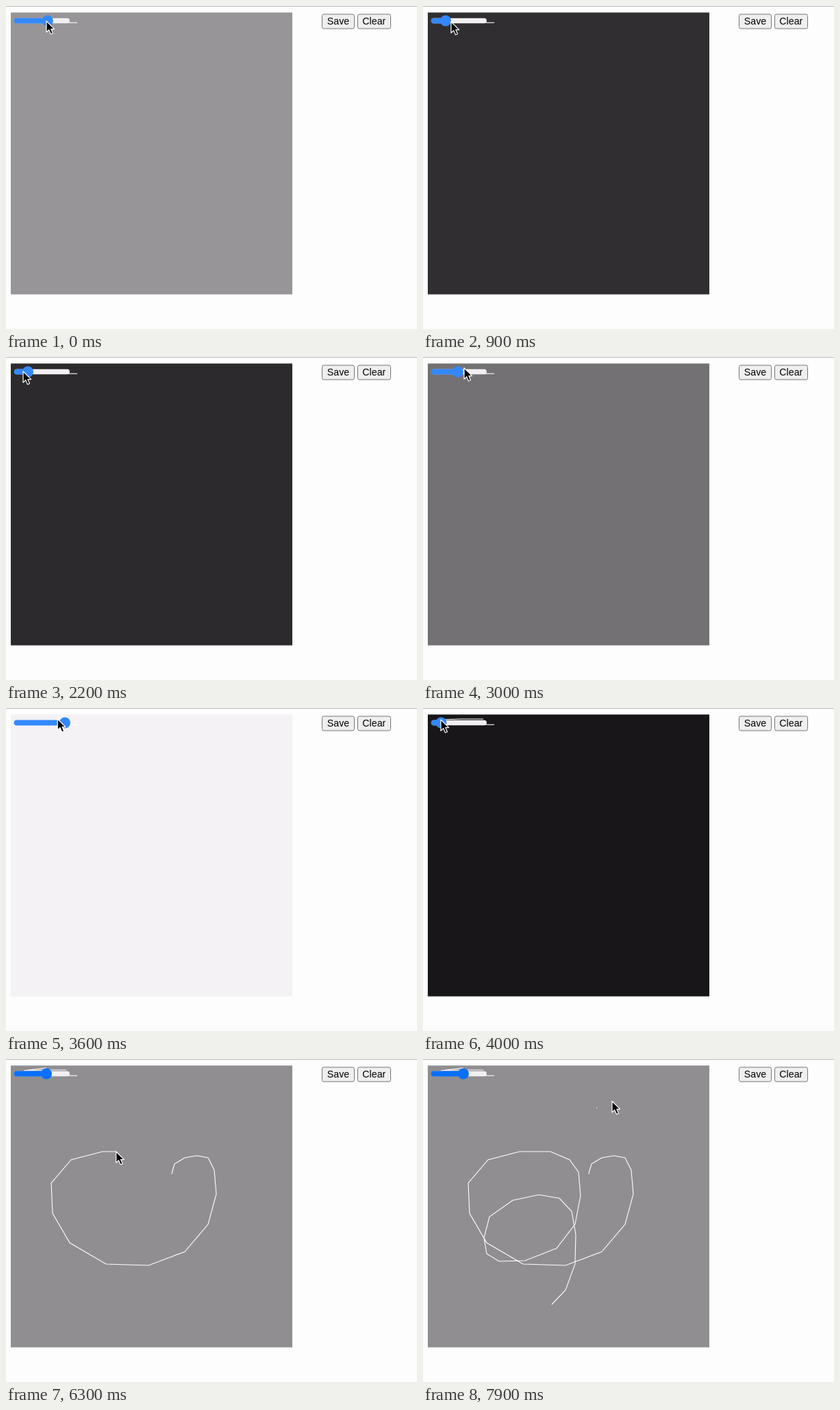
An HTML page for the animation above (8 s loop, 600x471 px).

```html
<!DOCTYPE html>
<html lang="en">
<head>
<meta charset="utf-8">
<title>Drawing pad</title>
<style>
  html, body { margin: 0; width: 100%; height: 100%; overflow: hidden; background: #fefdfe; }
  svg { display: block; width: 600px; height: 471px; }
  text { font: 14.2px "Liberation Sans", Arial, sans-serif; text-anchor: middle; fill: #000; }
  .button { fill: #efefef; stroke: #767676; }
  .ink { fill: none; stroke: #fff; stroke-width: 1.1; }
</style>
</head>
<body>
<svg viewBox="0 0 600 471">
  <rect width="600" height="1" fill="#b9b8b9"/>
  <rect id="pad" x="7" y="9.5" width="411" height="411"/>
  <path class="ink" d="M80 24.3H104"/>
  <polyline class="ink" id="scribble"/>
  <polyline class="ink" id="drawing"/>
  <rect id="dot" x="253" y="70.5" width="1.2" height="1.2" fill="#fff"/>

  <rect x="12" y="17.7" width="81" height="7.6" rx="3.8" fill="#f2eff2"/>
  <g id="slider">
    <rect id="fill" x="11.7" y="17.5" height="8" rx="4"/>
    <circle id="thumb" cy="21.5" r="8"/>
  </g>

  <rect class="button" x="461.5" y="12" width="47" height="21" rx="2.5"/>
  <text x="485" y="27">Save</text>
  <rect class="button" x="513.5" y="12" width="48" height="21" rx="2.5"/>
  <text x="537.3" y="27">Clear</text>

  <path id="cursor" d="M0 0V16.2L3.7 12.7L6.5 19L9.5 17.7L6.8 11.6H11.7Z"
    fill="#000" stroke="#fff" stroke-width="1.2" stroke-linejoin="round"/>
</svg>
<script>
const LOOP = 8000, TICK = 100;
const DRAW_START = 5700, POINT_TIME = 36.5;
const get = id => document.getElementById(id);
const [pad, scribble, drawing, dot, slider, fill, thumb, cursor] =
  ["pad", "scribble", "drawing", "dot", "slider", "fill", "thumb", "cursor"].map(get);

const stroke = [
  [242, 168], [243, 163], [246, 153], [261, 144], [279, 141], [295, 144],
  [304, 162], [307, 197], [295, 241], [261, 281], [208, 301], [146, 299],
  [93, 268], [68, 225], [66, 181], [95, 147], [141, 135], [186, 135],
  [214, 147], [227, 165], [230, 199], [222, 241], [195, 276], [149, 294],
  [111, 295], [93, 284], [89, 261], [97, 230], [131, 206], [169, 198],
  [199, 203], [217, 222], [223, 256], [222, 299], [208, 337], [188, 358]
];

// [time, x, y]
const pointer = [
  [0, 59, 22], [600, 20, 23], [900, 41, 23], [1500, 84, 22], [2200, 25, 21],
  [2400, 18, 20], [3000, 60, 16], [3500, 88, 16], [3750, 56, 16], [4000, 26, 17],
  [4600, 59, 13], [5400, 59, 13],
  ...stroke.map(([x, y], i) => [DRAW_START + i * POINT_TIME, x, y]),
  [7200, 223, 99], [7400, 254, 70], [7600, 254, 70], [7900, 276, 61.5], [LOOP, 276, 61.5]
];

// [time, thumb x]
const slide = [
  [0, 60.8], [650, 22], [900, 33], [1600, 82], [2200, 32], [2500, 22],
  [3000, 51], [3600, 86], [4000, 26.5], [4700, 59], [LOOP, 59]
];

function sample(keys, t) {
  const i = Math.max(1, keys.findIndex(k => k[0] >= t));
  const a = keys[i - 1], b = keys[i];
  const p = (t - a[0]) / (b[0] - a[0]);
  return a.slice(1).map((v, n) => v + (b[n + 1] - v) * p);
}

function trail(from, to, t) {
  if (t < from) return "";
  const done = pointer.filter(k => k[0] >= from && k[0] <= Math.min(t, to)).map(k => k.slice(1));
  if (t < to) done.push(sample(pointer, t));
  return done.join(" ");
}

function render(now) {
  const t = Math.floor(now % LOOP / TICK) * TICK;
  const [x, y] = sample(pointer, t);
  const [sx] = sample(slide, t);
  const grey = Math.round((sx - 20) / 0.27);

  pad.setAttribute("fill", `rgb(${grey},${Math.max(0, grey - 2)},${grey})`);
  fill.setAttribute("width", sx - 11.7);
  thumb.setAttribute("cx", sx);
  slider.setAttribute("fill", t < 5500 ? "#3488fb" : "#0a70fd");
  cursor.setAttribute("transform", `translate(${x} ${y})`);
  scribble.setAttribute("points", trail(3500, 4600, t));
  drawing.setAttribute("points", trail(DRAW_START, DRAW_START + (stroke.length - 1) * POINT_TIME, t));
  dot.setAttribute("visibility", t >= 7400 ? "visible" : "hidden");
  requestAnimationFrame(tick);
}

const start = performance.now();
function tick() { render(performance.now() - start); }
tick();
</script>
</body>
</html>
```
